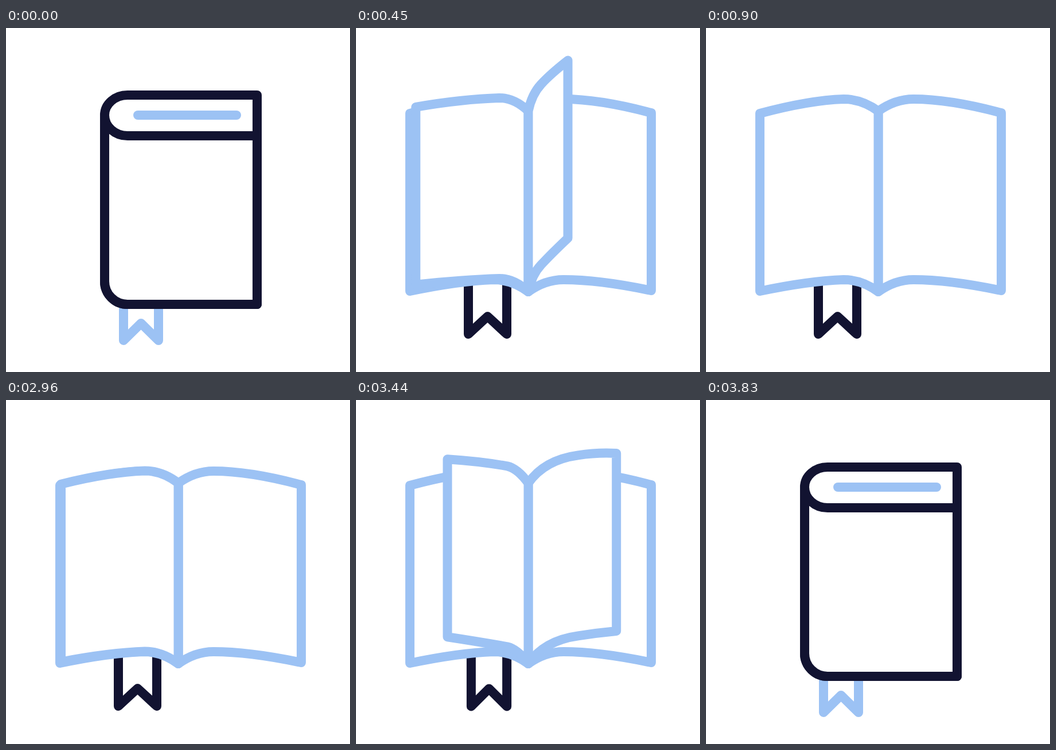
These frames come from a looping animation (600 px wide and 600 px high, 4860 ms). An HTML page:

```html
<!DOCTYPE html>
<html lang="en">
<head>
<meta charset="utf-8">
<title>Book</title>
<style>
  html, body { margin: 0; width: 100%; height: 100%; overflow: hidden; background: #fff; }
  svg { display: block; width: 100%; height: 100%; }
  path { fill: #fff; stroke-width: 16; stroke-linecap: round; stroke-linejoin: round; }
</style>
</head>
<body>
<svg id="stage" viewBox="0 0 600 600"></svg>
<script>
const DARK = '#121331', LIGHT = '#9cc2f4';
const LOOP = 4860, CLOSE_AT = 2945, SPAN = 885;
const PAGE_STARTS = [0, 194, 397], PAGE_TIME = 397, PAGES_GONE = 600;
const COVER_START = 525, MARK_START = 445;

const stage = document.getElementById('stage');
const addPath = () => stage.appendChild(document.createElementNS('http://www.w3.org/2000/svg', 'path'));
const mark = addPath(), back = addPath(), label = addPath(), front = addPath();
const pages = PAGE_STARTS.map(addPath);

const clamp = v => Math.max(0, Math.min(1, v));
const smooth = v => { v = clamp(v); return v * v * (3 - 2 * v); };
const lerp = (a, b, p) => a + (b - a) * p;
const mix = (a, b, p) => a.map((v, i) => lerp(v, b[i], p));

// An edge runs from the spine over a bend to the tip: spine, bend handle, bend, far handle, tip.
const SPINE = [300.5, 145];
const DROP = [315, 315, 315, 315, 310];
const lower = edge => edge.map((v, i) => i % 2 ? v + DROP[(i - 1) / 2] : v);

// Poses of a turning page from left to right, without the spine point.
const POSES = [
  [272, 124, 240, 124, 180, 126, 94, 149],
  [276, 122, 250, 122, 185, 124, 104, 138],
  [285, 119, 270, 112, 235, 98, 191, 87],
  [306, 116, 322, 98, 338, 80, 368, 56],
  [332, 104, 395, 98, 432, 95, 470, 102],
  [330, 124, 362, 124, 425, 124, 515, 148]
];
const KNOTS = POSES.map(p => (p[6] - 94) / 421);

const openLeft = [...SPINE, ...POSES[0]];
const openRight = [...SPINE, ...POSES[5]];
const shutBack = [172, 152, 172, 117, 212, 117, 325, 117, 438, 117];
const shutFront = [172, 152, 172, 188, 212, 188, 325, 188, 438, 188];
const shutBottom = [172, 442, 172, 482, 212, 482, 325, 482, 438, 482];

// h sets how round the bend is: 2/3 is a parabola, 0.552 a circle.
function outline(top, bottom, h) {
  const [sx, sy, ax, ay, mx, my, bx, by, tx, ty] = top;
  const [Sx, Sy, Ax, Ay, Mx, My, Bx, By, Tx, Ty] = bottom;
  const bend = (x, y, cx, cy, X, Y) =>
    `C${lerp(x, cx, h)} ${lerp(y, cy, h)} ${lerp(X, cx, h)} ${lerp(Y, cy, h)} ${X} ${Y}`;
  return `M${sx} ${sy}${bend(sx, sy, ax, ay, mx, my)}Q${bx} ${by} ${tx} ${ty}` +
    `L${Tx} ${Ty}Q${Bx} ${By} ${Mx} ${My}${bend(Mx, My, Ax, Ay, Sx, Sy)}Z`;
}

// Cardinal spline through the page poses.
function pose(k) {
  let i = 0;
  while (i < KNOTS.length - 2 && k > KNOTS[i + 1]) i++;
  const h = KNOTS[i + 1] - KNOTS[i], u = (k - KNOTS[i]) / h;
  const slope = (n, c) => (POSES[n + 1][c] - POSES[n][c]) / (KNOTS[n + 1] - KNOTS[n]);
  const tangent = (n, c) =>
    (slope(Math.max(n - 1, 0), c) + slope(Math.min(n, KNOTS.length - 2), c)) / 2;
  const edge = POSES[i].map((a, c) => {
    const b = POSES[i + 1][c], line = b - a;
    const m0 = lerp(line, tangent(i, c) * h, 0.5), m1 = lerp(line, tangent(i + 1, c) * h, 0.5);
    return a + u * (m0 + u * (3 * line - 2 * m0 - m1 + u * (m0 + m1 - 2 * line)));
  });
  edge[6] = 94 + 421 * k;
  return [...SPINE, ...edge];
}

function paint(el, d, color) {
  el.setAttribute('d', d);
  el.setAttribute('stroke', color);
}

function drawBook(p) {
  const h = lerp(2 / 3, 0.552, p), swing = 4 * p * (1 - p) * 18;
  const top = mix(openLeft, shutFront, p), bottom = mix(lower(openLeft), shutBottom, p);
  for (const edge of [top, bottom]) {
    edge[7] += swing / 2;
    edge[9] += swing;
  }
  const color = top[8] > top[0] ? DARK : LIGHT;
  paint(back, outline(mix(openRight, shutBack, p), mix(lower(openRight), shutBottom, p), h), color);
  paint(front, outline(top, bottom, h), color);

  const grown = clamp((p - 0.6) / 0.4), x = top[0] + 58;
  paint(label, grown ? `M${x} 152H${x + 172 * grown}` : '', LIGHT);
}

function drawMark(p) {
  const half = lerp(67, -61, p) / 2;
  const mid = lerp(229.5, 235.5, p) + 64 * p * (1 - p);
  const end = lerp(534, 545, p), notch = lerp(503, 515, p);
  paint(mark, `M${mid - half} 445V${end}L${mid} ${notch}L${mid + half} ${end}V445`,
    half > 0 ? DARK : LIGHT);
}

function drawPages(time, shift) {
  const turns = PAGE_STARTS.map(s => smooth((time - s) / PAGE_TIME))
    .sort((a, b) => Math.abs(b - 0.5) - Math.abs(a - 0.5));
  turns.forEach((k, i) => {
    const seen = k > 0 && k < 1 && time < PAGES_GONE;
    const edge = pose(k);
    paint(pages[i], seen ? outline(edge, lower(edge), 2 / 3) : '', LIGHT);
    pages[i].setAttribute('transform', `translate(${shift} 0)`);
  });
}

function draw(t) {
  // Opening is closing played backwards.
  const time = t < 1000 ? Math.max(0, SPAN - t) : Math.max(0, Math.min(SPAN, t - CLOSE_AT));
  const p = smooth((time - COVER_START) / (SPAN - COVER_START));
  drawMark(smooth((time - MARK_START) / (SPAN - MARK_START)));
  drawBook(p);
  drawPages(time, (172 - SPINE[0]) * p);
}

const start = performance.now();
function tick() {
  draw((performance.now() - start) % LOOP);
  requestAnimationFrame(tick);
}
tick();
</script>
</body>
</html>
```
